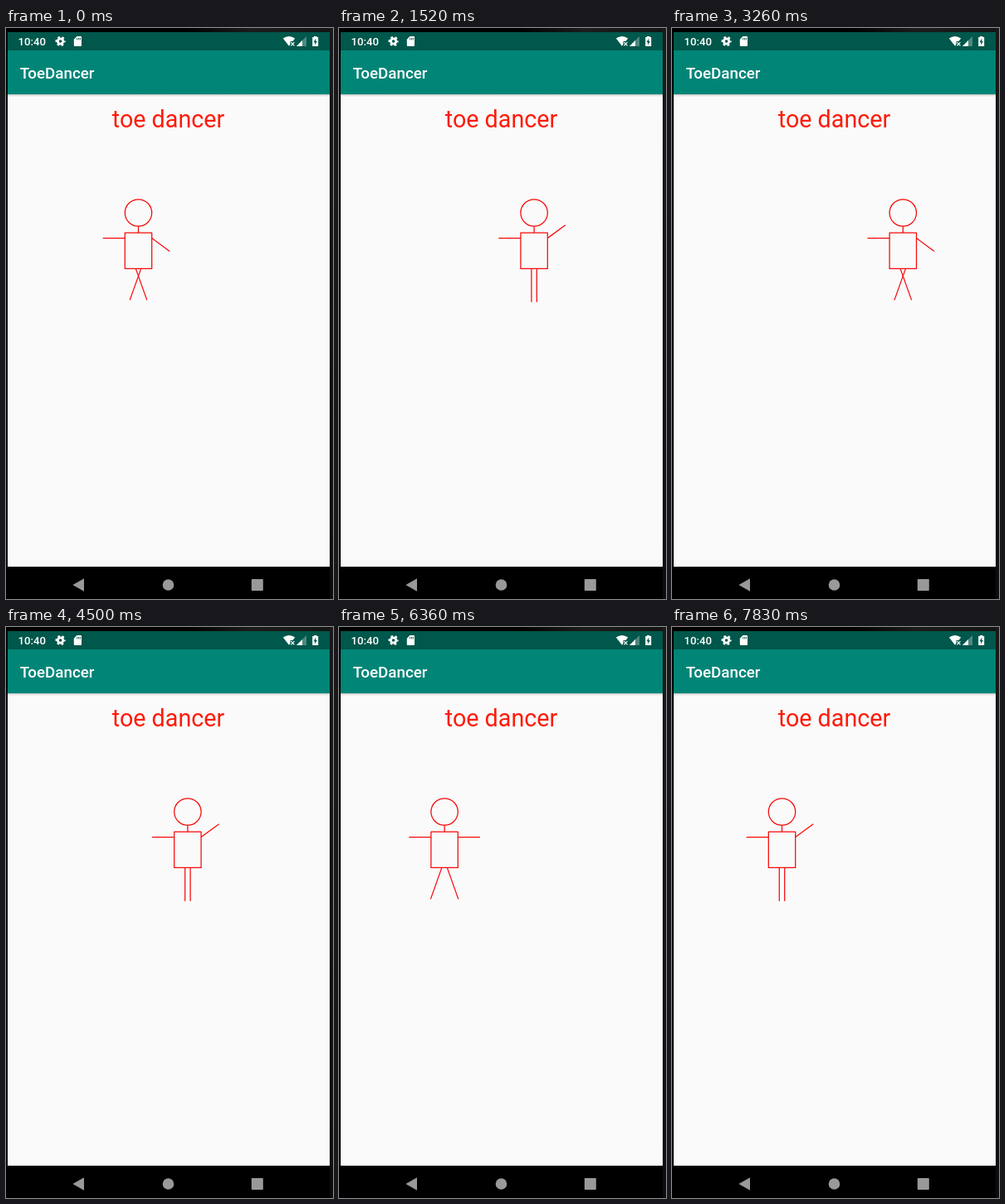
An HTML page without scripts for the animation above (7880 ms loop, 394x689 px).

```html
<!DOCTYPE html>
<html lang="en">
<head>
<meta charset="utf-8">
<title>ToeDancer</title>
<style>
  /* --n counts steps; --pose cycles 0, 1, 2 (integer properties round, so --round is floor(n / 3)) */
  @property --n { syntax: "<integer>"; inherits: true; initial-value: 0; }
  @property --round { syntax: "<integer>"; inherits: true; initial-value: 0; }
  @property --pose { syntax: "<integer>"; inherits: true; initial-value: 0; }

  html, body { margin: 0; width: 100%; height: 100%; overflow: hidden; background: #000; }
  svg { display: block; width: 394px; height: 689px; }
  text { font-family: Roboto, sans-serif; }
  .medium { font-weight: 500; fill: #fff; }

  .figure {
    fill: none;
    stroke: #f80808;
    stroke-width: 1.25;
    stroke-linejoin: round;
    animation: walk 7880ms step-end infinite;
    --round: calc((var(--n) - 1) / 3);
    --pose: calc(var(--n) - 3 * var(--round));
    /* right to step 26, left to step 64, then right again */
    transform: translateX(calc(5.4px * max(min(var(--n), 52 - var(--n)), var(--n) - 76)));
  }
  .arm { transform: rotate(calc((1 - var(--pose)) * 36.4deg)); }
  /* crossed, spread, straight: -1, 1, 0 */
  .leg { transform: rotate(calc((var(--pose) * (3.5 - 1.5 * var(--pose)) - 1) * 19.6deg)); }

  @keyframes walk {
    0% { --n: 0; }
    .5% { --n: 1; }
    2.41% { --n: 2; animation-timing-function: steps(4); }
    7.61% { --n: 6; }
    9.51% { --n: 7; }
    10.53% { --n: 8; }
    12.43% { --n: 9; }
    13.45% { --n: 10; }
    15.35% { --n: 11; animation-timing-function: steps(6); }
    22.84% { --n: 17; }
    24.74% { --n: 18; }
    26.39% { --n: 19; }
    27.02% { --n: 20; }
    28.8% { --n: 21; }
    30.58% { --n: 22; }
    32.36% { --n: 23; animation-timing-function: steps(3); }
    35.91% { --n: 26; }
    37.81% { --n: 27; animation-timing-function: steps(3); }
    41.37% { --n: 30; }
    43.02% { --n: 31; }
    44.03% { --n: 32; }
    45.93% { --n: 33; animation-timing-function: steps(5); }
    52.41% { --n: 38; }
    54.31% { --n: 39; }
    55.32% { --n: 40; }
    57.1% { --n: 41; }
    58.24% { --n: 42; }
    60.15% { --n: 43; animation-timing-function: steps(2); }
    62.56% { --n: 45; }
    64.21% { --n: 46; animation-timing-function: steps(2); }
    66.49% { --n: 48; }
    68.4% { --n: 49; animation-timing-function: steps(2); }
    70.68% { --n: 51; }
    72.58% { --n: 52; animation-timing-function: steps(3); }
    76.64% { --n: 55; }
    78.42% { --n: 56; animation-timing-function: steps(2); }
    80.71% { --n: 58; }
    82.99% { --n: 59; animation-timing-function: steps(8); }
    92.89% { --n: 67; }
    94.54% { --n: 68; }
    96.44% { --n: 69; animation-timing-function: steps(2); }
    99.36%, 100% { --n: 71; }
  }
</style>
</head>
<body>
<svg viewBox="0 0 394 689">
  <defs>
    <linearGradient id="bezel">
      <stop offset=".55" stop-color="#000"/>
      <stop offset=".75" stop-color="#1c1c1c"/>
      <stop offset="1" stop-color="#141414"/>
    </linearGradient>
    <linearGradient id="side" x2="0" y2="1">
      <stop stop-color="#1a1a1a"/>
      <stop offset="1" stop-color="#0c0c0c"/>
    </linearGradient>
    <linearGradient id="shadow" x2="0" y2="1">
      <stop stop-color="#000" stop-opacity=".2"/>
      <stop offset="1" stop-color="#000" stop-opacity="0"/>
    </linearGradient>
  </defs>

  <rect width="394" height="689"/>
  <rect width="394" height="5" fill="url(#bezel)"/>
  <rect x="390" width="4" height="689" fill="url(#side)"/>
  <rect x="2" y="80" width="388" height="570" fill="#fafafa"/>
  <rect x="2" y="80" width="388" height="3" fill="url(#shadow)"/>
  <rect x="2" y="27" width="388" height="53" fill="#008577"/>
  <rect x="2" y="5" width="388" height="22" fill="#00574b"/>

  <!-- status bar -->
  <text class="medium" x="14.6" y="21" font-size="13.2">10:40</text>
  <g fill="#fff">
    <g transform="translate(65.6 16)">
      <circle r="3.2" fill="none" stroke="#fff" stroke-width="2.8"/>
      <circle r="5" fill="none" stroke="#fff" stroke-width="2.2" stroke-dasharray="2.6 2.636" stroke-dashoffset="1.3"/>
    </g>
    <path d="M85.5 10H90q1 0 1 1V21q0 1-1 1H82.8q-1 0-1-1V13.8Z"/>
    <path d="M85.7 12v2.4M87.6 12v2.4M89.4 12v2.4" stroke="#00574b" stroke-width=".9"/>
    <path d="M341 21.8 333.8 12.6Q341 7.6 348.2 12.6Z"/>
    <path d="M342.5 16H349V23H342.5Z" fill="#00574b"/>
    <path d="M343.4 17.2 347.4 21.4M347.4 17.2 343.4 21.4" stroke="#fff" stroke-width="1.2"/>
    <path d="M350 22H362V10Z" opacity=".3"/>
    <path d="M350 22H357V15Z"/>
    <path d="M371 11V10H374.4V11H376.2V22H369.2V11Z"/>
    <path d="M373.3 12.6 370.6 17.2H372.2V20.6L374.9 16H373.3Z" fill="#00574b"/>
  </g>

  <text class="medium" x="16.8" y="61" font-size="18.8">ToeDancer</text>
  <text x="195.5" y="119.6" font-size="28.7" text-anchor="middle" fill="#ff1a08">toe dancer</text>

  <g class="figure">
    <g transform="translate(159.5 0)">
      <circle cy="223" r="16.2"/>
      <path d="M0 239.2V247M-42.8 253.6H-16.2"/>
      <rect x="-16.2" y="247.2" width="32.4" height="43.2"/>
      <g transform="translate(16.2 253.6)"><path class="arm" d="M0 0H26.7"/></g>
      <g transform="translate(-3.2 290.4)"><path class="leg" d="M0 0V40.3"/></g>
      <g transform="translate(3.2 290.4) scale(-1 1)"><path class="leg" d="M0 0V40.3"/></g>
    </g>
  </g>

  <!-- navigation bar -->
  <g fill="#999">
    <path d="M80.4 672 94 664.2V679.8Z"/>
    <circle cx="195.5" cy="672" r="6.8"/>
    <rect x="295.8" y="665" width="14" height="14" rx=".8"/>
  </g>
</svg>
</body>
</html>
```
